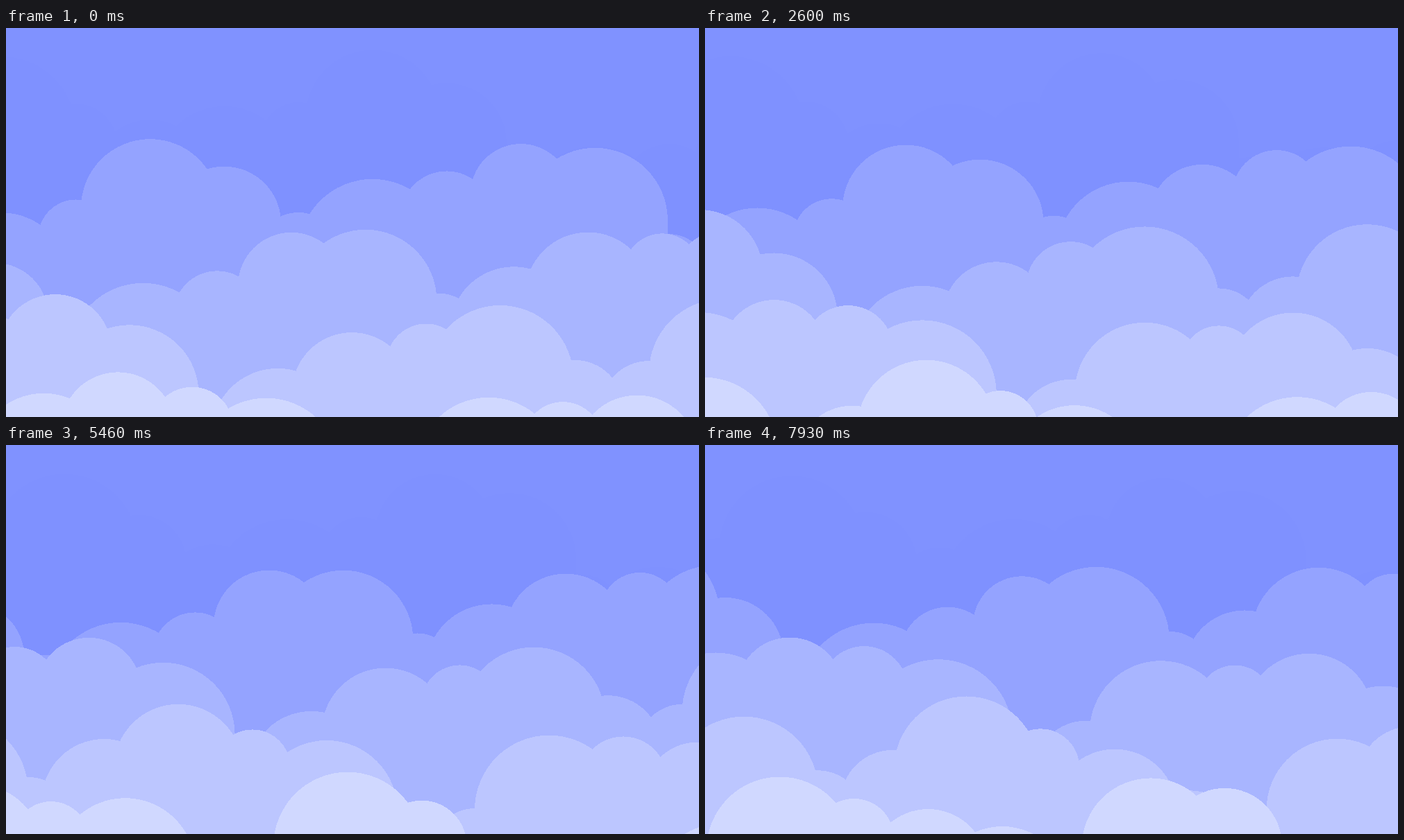
Write an HTML page that moves like this. It is 998 px wide and 561 px high and loops after 8 s.

```html
<!DOCTYPE html>
<html lang="en">
<head>
<meta charset="utf-8">
<title>Drifting clouds</title>
<style>
  html, body { margin: 0; width: 100%; height: 100%; overflow: hidden; background: #8092ff; }
  svg { display: block; width: 100%; height: 100%; }
</style>
</head>
<body>
<svg viewBox="0 0 998 561" preserveAspectRatio="none" shape-rendering="crispEdges"></svg>
<script>
const LOOP = 8000, STEP = 130;
const WIDTH = 998, SPACING = 106.8, LAYER_DROP = 112;
const PULSE = 0.00478; // radians of swelling per pixel of drift

// Back to front; x is where puff 0 starts, speed is in pixels per second
const layers = [
  { color: '#7f91ff', x: -540, speed: 16.5 },
  { color: '#94a3ff', x: -326.5, speed: 31.4 },
  { color: '#a8b5ff', x: -123, speed: 44.4 },
  { color: '#bcc6ff', x: 71, speed: 52 },
  { color: '#d0d8ff', x: 268, speed: 60.6 }
];

const svg = document.querySelector('svg');
for (const layer of layers) {
  layer.path = document.createElementNS('http://www.w3.org/2000/svg', 'path');
  layer.path.setAttribute('fill', layer.color);
  svg.append(layer.path);
}

// All layers share one skyline: a long and a short wave on a slight slope
function skyline(i) {
  return 185.5 + 1.7 * (i - 3)
    + 28 * Math.cos(0.56 * (i - 2.9))
    + 52 * Math.cos(1.205 * (i - 2.36));
}

// Each puff swells a fixed phase behind its left neighbour
function radius(i, depth, drift) {
  return 80.5 + 26.5 * Math.cos(PULSE * drift - 2.293 * i + 0.939 * depth - 1.272);
}

// A dome whose sides run straight down below the stage
function dome(x, y, r) {
  const f = n => n.toFixed(2);
  return `M${f(x - r)} 900V${f(y)}A${f(r)} ${f(r)} 0 0 1 ${f(x + r)} ${f(y)}V900Z`;
}

function draw(seconds) {
  layers.forEach(({ x, speed, path }, depth) => {
    const drift = speed * seconds;
    const left = x + drift;
    const first = Math.floor(-left / SPACING) - 1;
    const last = Math.ceil((WIDTH - left) / SPACING) + 1;
    let d = '';
    for (let i = first; i <= last; i++) {
      d += dome(left + i * SPACING, skyline(i) + depth * LAYER_DROP, radius(i, depth, drift));
    }
    path.setAttribute('d', d);
  });
}

const start = performance.now();
function tick() {
  const t = (performance.now() - start) % LOOP;
  draw(Math.floor(t / STEP) * STEP / 1000);
  requestAnimationFrame(tick);
}
tick();
</script>
</body>
</html>
```
